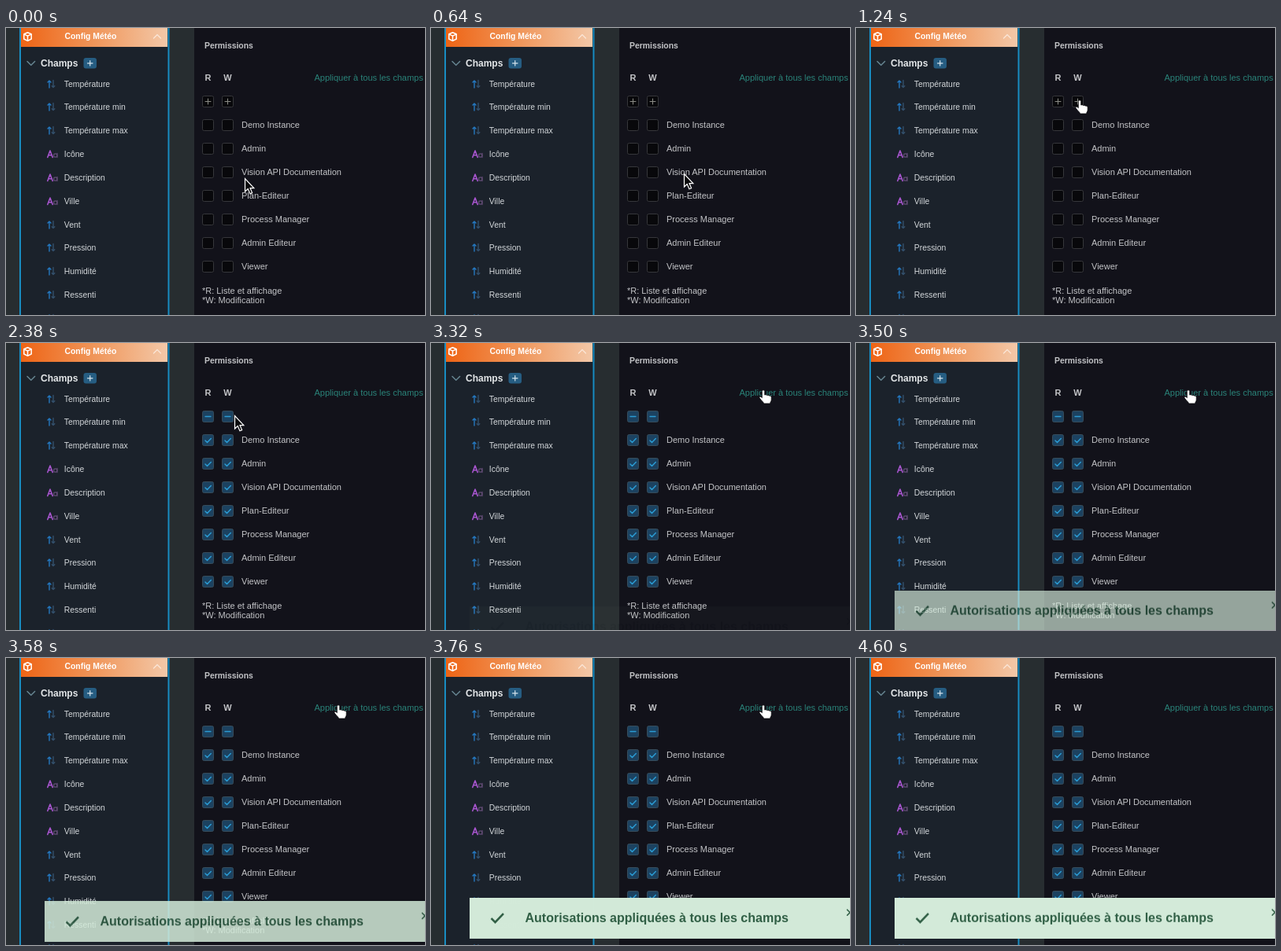
An HTML page for the animation above (4900 ms loop, 532x365 px).

```html
<!DOCTYPE html>
<html lang="fr">
<head>
<meta charset="utf-8">
<title>Permissions</title>
<style>
  html, body { margin: 0; width: 100%; height: 100%; overflow: hidden; background: #12121a; }
  svg { display: block; width: 532px; height: 365px; }
  text { font: 11px "Liberation Sans", Arial, sans-serif; fill: #c3c4c7; white-space: pre; }
  .bold { font-weight: bold; }
  .small { font-size: 10.4px; }
  .label { fill: #d3d7da; }
  .line { fill: none; stroke-linecap: round; stroke-linejoin: round; }
</style>
</head>
<body>
<svg viewBox="0 0 532 365" xmlns="http://www.w3.org/2000/svg">
  <defs>
    <linearGradient id="heat">
      <stop offset="0" stop-color="#ee6415"/>
      <stop offset=".5" stop-color="#f0965a"/>
      <stop offset="1" stop-color="#f3c8a8"/>
    </linearGradient>
    <g id="number" class="line" stroke-width="1.4">
      <path d="M55 76V67M53 69l2-2 2 2" stroke="#2478c0"/>
      <path d="M60 66.5V75.5M58.2 73.7l1.8 1.8 1.8-1.8" stroke="#33506c"/>
    </g>
    <g id="string" class="line">
      <path d="M52.8 75.5L56 67l3.200 8.500M54 72.800h4" stroke="#a855cf" stroke-width="1.6"/>
      <path d="M65 70.500v5" stroke="#5f4a72" stroke-width="1.3"/>
      <circle cx="62.700" cy="73" r="2.200" stroke="#5f4a72" stroke-width="1.3"/>
    </g>
    <rect id="empty" x="-7" y="-7" width="14" height="14" rx="2" fill="#08080b" stroke="#36373b"/>
    <rect id="filled" x="-7" y="-7" width="14" height="14" rx="2" fill="#1c4260" stroke="#374c5b"/>
    <path id="plus" class="line" d="M-3.500 0h7M0-3.500v7" stroke="#8b8c86"/>
    <path id="minus" class="line" d="M-3.500 0h7" stroke="#2b9bd3" stroke-width="1.3"/>
    <path id="tick" class="line" d="M-3.500 .5l2.500 2.500 4.800-5" stroke="#2b9bd3" stroke-width="1.5"/>
  </defs>

  <rect width="239" height="365" fill="#272d30"/>
  <rect x="17" width="191" height="365" fill="#1b222b"/>
  <path d="M18 0V365M206.500 0V365" stroke="#198dc2" stroke-width="2"/>
  <rect x="19" width="186" height="24" fill="url(#heat)"/>
  <path class="line" d="M27.500 5.700l4.700 2v6.300l-4.700 2.300-4.700-2.300V7.700zM22.800 7.900l4.700 2.200 4.700-2.200M27.500 10.100v6" stroke="#fff" stroke-width="1.5"/>
  <text class="bold small" x="74.500" y="14" style="fill:#fff">Config Météo</text>
  <path class="line" d="M187.500 13l4.500-4.500 4.500 4.500" stroke="#fae6d6" stroke-width="1.300"/>
  <path class="line" d="M27 42.500l4.800 4.800 4.800-4.800" stroke="#668591" stroke-width="1.500"/>
  <text class="bold" x="44" y="49" style="font-size:12px;fill:#e4e7e9">Champs</text>
  <rect x="98.500" y="38" width="16.500" height="13.500" rx="3" fill="#265d82"/>
  <path class="line" d="M103.500 44.800h6.500M106.750 41.500v6.500" stroke="#d5e3ec" stroke-width="1.200"/>
  <g id="fields"></g>

  <rect x="239" width="293" height="365" fill="#12121a"/>
  <text class="bold small" x="252" y="26">Permissions</text>
  <text class="bold" x="252.500" y="67">R</text>
  <text class="bold" x="276.300" y="67">W</text>
  <text x="391.500" y="67" style="fill:#2a8379">Appliquer à tous les champs</text>
  <g id="roles"></g>
  <g id="off"></g>
  <g id="on"></g>
  <text x="249" y="338">*R: Liste et affichage</text>
  <text x="249" y="350">*W: Modification</text>

  <g id="toast" opacity="0">
    <rect x="49" y="305" width="500" height="52" fill="#d3ead9"/>
    <path class="line" d="M76.500 331l5 5L92 325" stroke="#305f45" stroke-width="2.600" style="stroke-linecap:butt;stroke-linejoin:miter"/>
    <text class="bold" x="119.500" y="336" style="font-size:16px;fill:#305f45">Autorisations appliquées à tous les champs</text>
    <path class="line" d="M528.500 320l7 7M535.500 320l-7 7" stroke="#305f45" stroke-width="1.600"/>
  </g>

  <g id="cursor">
    <path id="arrow" d="M.5.5v16.500l3.700-3.500 2.700 6.300 2.700-1.200-2.600-6h4.800z" fill="#0a0a0c" stroke="#fff" stroke-width="1.200"/>
    <path id="hand" d="M-1.700 1.500a1.700 1.700 0 0 1 3.400 0V6q1.700-.9 2.800.5 1.700-.8 2.800.6 2.600-.7 2.900 1.700V12q0 2-1.400 3.700V17H.2v-1.300Q-2 14-5 9.800q-.6-1.700 1-1.800 1 .1 2.300 1.700z" fill="#fff" stroke="#0a0a0c" stroke-width=".8"/>
  </g>
</svg>
<script>
const LOOP = 4900;
const byId = id => document.getElementById(id);
const use = (id, x, y) => `<use href="#${id}" x="${x}" y="${y}"/>`;

// Static lists
const fields = ["Température", "Température min", "Température max", "Icône", "Description",
  "Ville", "Vent", "Pression", "Humidité", "Ressenti"];
byId("fields").innerHTML = fields.map((name, i) => {
  const y = Math.round(74.6 + 29.84 * i);
  const icon = i > 2 && i < 6 ? "string" : "number";
  return use(icon, 0, y - 75) + `<text class="small label" x="73.8" y="${y}">${name}</text>`;
}).join("") + use("number", 0, 298);

const roles = ["Demo Instance", "Admin", "Vision API Documentation", "Plan-Editeur",
  "Process Manager", "Admin Editeur", "Viewer"];
byId("roles").innerHTML = roles.map((name, i) =>
  `<text x="299" y="${127 + 30 * i}">${name}</text>`).join("");

function boxes(box, head, mark) {
  let out = "";
  for (let row = 0; row <= roles.length; row++) {
    for (const x of [256.5, 281.5]) {
      const y = 93.5 + 30 * row;
      const sign = row ? mark : head;
      out += use(box, x, y) + (sign ? use(sign, x, y) : "");
    }
  }
  return out;
}
byId("off").innerHTML = boxes("empty", "plus", "");
byId("on").innerHTML = boxes("filled", "minus", "tick");

// Motion
const play = (id, frames) => byId(id).animate(frames, { duration: LOOP, iterations: Infinity });

// steps: [time, value], each value held until the next time
function hold(id, prop, steps) {
  const frames = steps.map(([t, v]) => ({ offset: t / LOOP, [prop]: v, easing: "step-end" }));
  frames.push({ offset: 1, [prop]: steps[steps.length - 1][1] });
  play(id, frames);
}

// Spreads points evenly from one time to another
const spread = (from, to, points) =>
  points.map(([x, y], i) => [from + (to - from) * i / (points.length - 1), x, y]);

const path = [
  [0, 303, 191],
  ...spread(540, 1040, [[313, 196], [321, 185], [318, 160], [305, 130], [285, 106], [278, 95], [285, 88]]),
  [1240, 284, 92],
  ...spread(2380, 2880, [[290, 92], [301, 89], [325, 83], [358, 75], [390, 67], [411, 61], [420, 60]]),
  [2980, 422, 60],
  ...spread(4200, 4600, [[408, 55], [372, 46], [318, 34], [252, 22], [180, 10], [117, 1], [60, -40]])
];
hold("cursor", "transform", path.map(([t, x, y]) => [t, `translate(${x}px, ${y}px)`]));

const handTimes = [[0, 0], [1240, 1], [2380, 0], [2880, 1], [4200, 0]];
hold("hand", "opacity", handTimes);
hold("arrow", "opacity", handTimes.map(([t, v]) => [t, 1 - v]));

hold("on", "opacity", [[0, 0], [1680, 1]]);
hold("off", "opacity", [[0, 1], [1680, 0]]);

const low = { opacity: 0, transform: "translateY(31.2px)" };
const up = { opacity: 1, transform: "translateY(0px)" };
play("toast", [
  { ...low, offset: 0 },
  { ...low, offset: 3300 / LOOP, easing: "ease" },
  { ...up, offset: 3800 / LOOP },
  { ...up, offset: 1 }
]);
</script>
</body>
</html>
```
